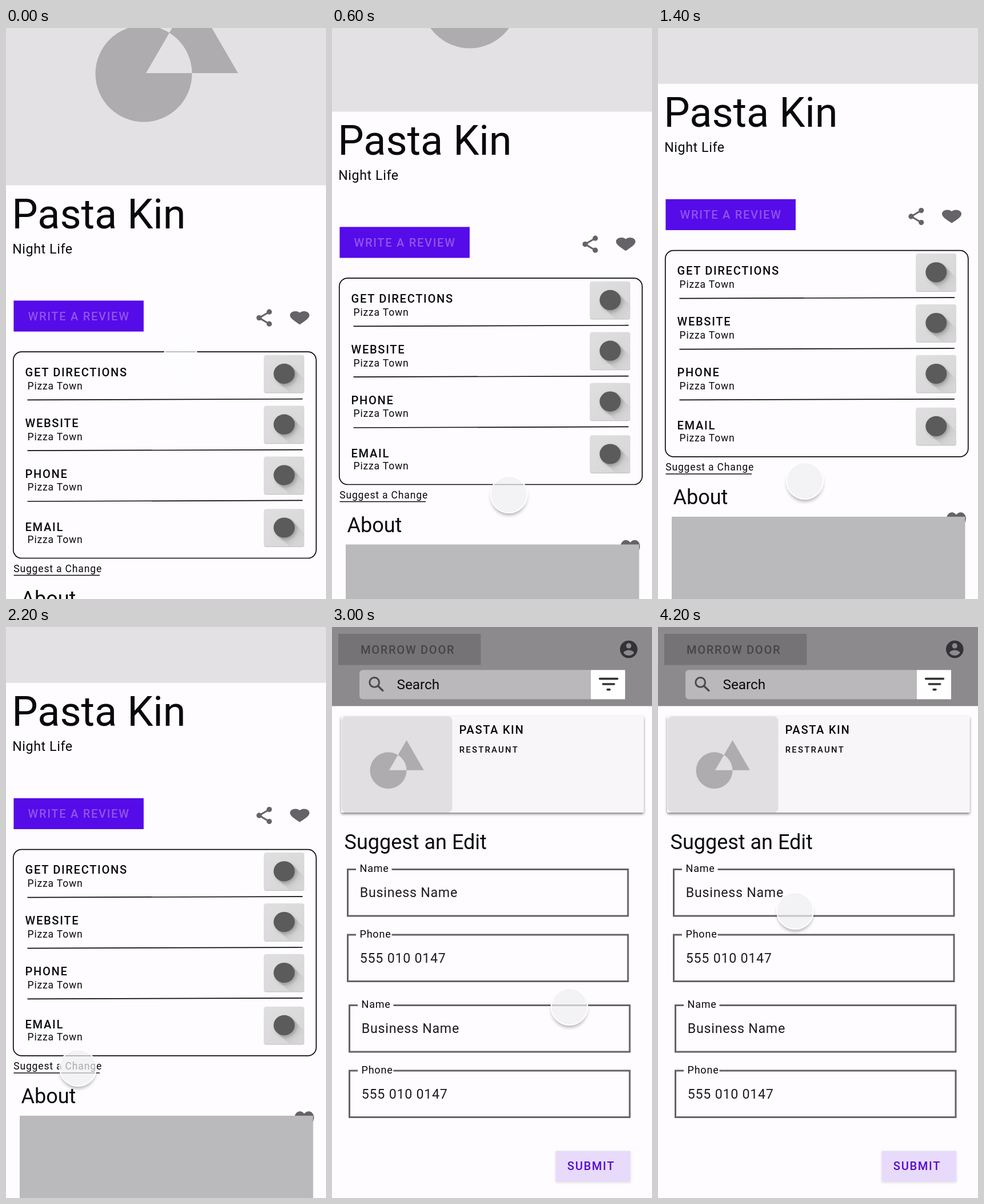
Animation, 560 px wide and 1000 px high, one loop 4400 ms. Source, as an HTML page:

```html
<!DOCTYPE html>
<html lang="en">
<head>
<meta charset="utf-8">
<title>Suggest an edit</title>
<style>
html, body { margin: 0; width: 100%; height: 100%; overflow: hidden; background: #fefcff; }
svg { display: block; width: 100%; height: 100%; }
text { font-family: Roboto, sans-serif; fill: #09090b; white-space: pre; }
.caps { font-size: 20.1px; font-weight: 500; letter-spacing: 1.7px; }
.over { font-size: 14.8px; font-weight: 500; letter-spacing: 2.3px; }
.body { font-size: 23.2px; letter-spacing: .75px; }
.sub { font-size: 23.2px; letter-spacing: .6px; }
.small { font-size: 17.5px; letter-spacing: .85px; }
.label { font-size: 18px; letter-spacing: .8px; }
.head { font-size: 36px; }
.title { font-size: 72px; }
.find { font-size: 24.3px; }
</style>
</head>
<body>
<svg viewBox="0 0 560 1000" preserveAspectRatio="none">
  <defs>
    <path id="heart" d="M12 21.35l-1.45-1.32C5.4 15.36 2 12.28 2 8.5 2 5.42 4.42 3 7.5 3c1.74 0 3.41.81 4.5 2.09C13.09 3.81 14.76 3 16.5 3 19.58 3 22 5.42 22 8.5c0 3.78-3.4 6.86-8.55 11.54z" fill="#656368"/>
    <path id="shapes" fill="#aeacaf" fill-rule="evenodd" d="M156.5 80a84.5 84.5 0 1 0 169 0a84.5 84.5 0 1 0-169 0zM245 79H406L325.5-60z"/>
    <linearGradient id="tile" x2="1" y2="1">
      <stop stop-color="#dfdfdf"/><stop offset="1" stop-color="#d6d6d6"/>
    </linearGradient>
    <linearGradient id="cast" gradientUnits="userSpaceOnUse" x1="36" y1="33" x2="66" y2="62">
      <stop stop-color="#a4a4a4"/><stop offset="1" stop-color="#d0d0d0" stop-opacity="0"/>
    </linearGradient>
    <filter id="soft" x="-40%" y="-40%" width="180%" height="180%"><feGaussianBlur stdDeviation="3"/></filter>
    <filter id="lift" x="-10%" y="-20%" width="120%" height="150%">
      <feDropShadow dx="0" dy="2.5" stdDeviation="2" flood-color="#000" flood-opacity=".5"/>
    </filter>
    <filter id="faint" x="-10%" y="-20%" width="120%" height="150%">
      <feDropShadow dx="0" dy="2" stdDeviation="2" flood-color="#000" flood-opacity=".12"/>
    </filter>
    <mask id="outside" maskUnits="userSpaceOnUse" x="-60" y="-60" width="120" height="120">
      <rect x="-60" y="-60" width="120" height="120" fill="#fff"/><circle r="33"/>
    </mask>
  </defs>
  <rect width="560" height="1000" fill="#fefcff"/>
  <g id="place"></g>
  <g id="form"></g>
  <g id="cursor">
    <g mask="url(#outside)"><circle id="shade" cy="5" r="31" filter="url(#soft)"/></g>
    <circle id="disc" r="32"/>
    <circle r="32" fill="none" stroke="#fff" stroke-width="2"/>
  </g>
</svg>
<script>
const LOOP = 4400, STEP = 200, SWITCH = 2400;
const $ = id => document.getElementById(id);
const text = (x, y, cls, s, fill) =>
  `<text x="${x}" y="${y}" class="${cls}"${fill ? ` style="fill:${fill}"` : ''}>${s}</text>`;
const rect = (x, y, w, h, fill, more = '') =>
  `<rect x="${x}" y="${y}" width="${w}" height="${h}" fill="${fill}" ${more}/>`;
const line = (x1, y1, x2, y2, color, w) =>
  `<line x1="${x1}" y1="${y1}" x2="${x2}" y2="${y2}" stroke="${color}" stroke-width="${w}"/>`;
const dot = (x, y, r, fill) => `<circle cx="${x}" cy="${y}" r="${r}" fill="${fill}"/>`;
const use = (id, x, y, sx, sy = sx) =>
  `<use href="#${id}" transform="translate(${x} ${y}) scale(${sx} ${sy})"/>`;

const tile = y => `<g transform="translate(451.5 ${y})">
  ${rect(0, .8, 70.5, 66, '#bdbdbd', 'rx="4"')}${rect(0, 0, 70.5, 65.8, 'url(#tile)', 'rx="4"')}
  <path d="M48 20L70 42V65.5H45L23 46z" fill="url(#cast)"/>
  <ellipse cx="38" cy="36" rx="18" ry="17" opacity=".22" filter="url(#soft)"/>
  <ellipse cx="35.3" cy="32.7" rx="18.5" ry="17.6" fill="#5c5b5c"/></g>`;

const row = (name, y, iconY) =>
  text(33.5, y, 'caps', name) + text(37.5, y + (name === 'EMAIL' ? 21 : 22.5), 'small', 'Pizza Town') + tile(iconY);

const share = [[460.7, 497.2], [460.7, 518.2]].map(([x, y]) =>
  line(443, 507.6, x, y, '#656368', 3) + dot(x, y, 4.6, '#656368')).join('') + dot(443, 507.6, 4.7, '#656368');

$('place').innerHTML =
  rect(0, 0, 560, 275.5, '#e3e1e4') + use('shapes', 0, 0, 1) +
  text(10.2, 351, 'title', 'Pasta Kin') + text(11.2, 395, 'sub', 'Night Life') +
  rect(13.4, 477.4, 227.5, 54.2, '#560be9') + text(38.5, 512, 'caps', 'WRITE A REVIEW', '#9152ee') +
  share + use('heart', 493.6, 492.2, 1.7, 1.27) +
  rect(12.8, 567.2, 530, 361.3, 'none', 'rx="14.4" stroke="#0b0a0d" stroke-width="1.7"') +
  row('GET DIRECTIONS', 610, 572.7) + row('WEBSITE', 699, 661.5) +
  row('PHONE', 787.7, 750.4) + row('EMAIL', 881, 842.3) +
  [651.3, 740.2, 829].map(y => line(37.5, y, 519, y - 1.6, '#0b0a0d', 1.7)).join('') +
  text(13.2, 953, 'small', 'Suggest a Change') + line(13.5, 958.6, 164, 958.6, '#0b0a0d', 1.5) +
  text(26.5, 1012, 'head', 'About') + use('heart', 501.6, 1019.8, 1.7, 2) +
  rect(24, 1033.5, 513.5, 400, '#bab9bb');

const field = (x, y, label, value) => `<g transform="translate(${x} ${y})">
  <path d="M16 1.5H1.5V83H492V1.5H78.5" fill="none" stroke="#656368" stroke-width="3"/>
  ${text(22.5, 6.3, 'label', label)}${text(22.8, 50, 'body', value, '#1c1b1f')}</g>`;
const fields = (x, y) => field(x, y, 'Name', 'Business Name') + field(x, y + 114.6, 'Phone', '555 010 0147');

const account = `<g transform="translate(500.9 20.7) scale(1.53)">${dot(12, 12, 10, '#333236')}${dot(12, 8, 3, '#8c8a8c')}
  <path d="M12 19.2c-2.5 0-4.71-1.28-6-3.22.03-1.99 4-3.08 6-3.08s5.97 1.09 6 3.08c-1.29 1.94-3.5 3.22-6 3.22z" fill="#8c8a8c"/></g>`;

$('form').innerHTML =
  rect(0, 0, 560, 1000, '#fefcff') + rect(0, 0, 560, 138.5, '#8c8a8c') +
  rect(11, 12, 249.3, 54.5, '#757375') + text(50, 46.5, 'caps', 'MORROW DOOR', '#454447') + account +
  '<path d="M453 75.3H54a6 6 0 0 0-6 6V120.5a6 6 0 0 0 6 6H453z" fill="#bab8bb"/>' +
  '<circle cx="74.2" cy="96.9" r="8.4" fill="none" stroke="#4a494c" stroke-width="3"/>' +
  line(80.5, 103.2, 89.8, 112.4, '#4a494c', 3.4) +
  text(113.5, 108.5, 'find', 'Search') + rect(453, 75.3, 60, 51.2, '#fff') +
  [[17.2, 90.6], [11.5, 100], [3.7, 109.6]].map(([w, y]) =>
    rect(484 - w, y - 1.8, w * 2, 3.6, '#333236', 'rx="1.8"')).join('') +
  rect(16, 156, 529.5, 169, '#f8f6f9', 'rx="2" filter="url(#lift)"') +
  rect(17, 156.5, 193.5, 168.5, '#e1dfe2', 'rx="8"') + use('shapes', 7.4, 221, .378) +
  text(222.5, 187, 'caps', 'PASTA KIN') + text(222.8, 220, 'over', 'RESTRAUNT') +
  text(21.5, 389, 'head', 'Suggest an Edit') + fields(26, 423) + fields(29, 661) +
  rect(391.5, 917.5, 130.8, 53.5, '#e8dafb', 'filter="url(#faint)"') +
  text(411.8, 951, 'caps', 'SUBMIT', '#560bcb');

// [time, value, ...]
const scroll = [[0, 0], [200, 59.5], [400, 101], [600, 129], [800, 147.8], [1000, 162.5], [1200, 177.6]];
const path = [
  [0, 305.5, 583], [200, 305, 569.5], [600, 309.5, 817], [1000, 308, 796.5], [1200, 290, 796], [1400, 257, 793],
  [1600, 187, 788], [1800, 161, 780], [2000, 140, 777], [2200, 126, 772], [2800, 126, 772],
  [3000, 415.5, 665], [3200, 415.5, 665], [3400, 312, 555], [3600, 198, 396],
  [3800, 250, 352], [4000, 252, 350], [4200, 240, 497]
];

function at(keys, t) {
  const i = keys.findIndex(k => k[0] > t);
  if (i < 0) return keys[keys.length - 1].slice(1);
  const a = keys[i - 1], b = keys[i], p = (t - a[0]) / (b[0] - a[0]);
  return a.slice(1).map((v, j) => v + (b[j + 1] - v) * p);
}

function draw(ms) {
  const t = Math.floor(ms % LOOP / STEP) * STEP;
  const pressed = t < 200 || (t >= 1000 && t < 1400);
  const hidden = t >= SWITCH && t < 2800;
  $('place').setAttribute('transform', `translate(0 ${-at(scroll, t)[0]})`);
  $('form').setAttribute('visibility', t < SWITCH ? 'hidden' : 'visible');
  $('cursor').setAttribute('transform', `translate(${at(path, t).join(' ')})`);
  $('cursor').setAttribute('visibility', hidden ? 'hidden' : 'visible');
  $('shade').setAttribute('opacity', pressed ? 0 : .32);
  $('disc').setAttribute('fill', pressed ? 'rgba(254,252,255,.7)' : 'rgba(239,238,241,.7)');
}

const start = performance.now();
function tick() {
  draw(performance.now() - start);
  requestAnimationFrame(tick);
}
tick();
</script>
</body>
</html>
```
